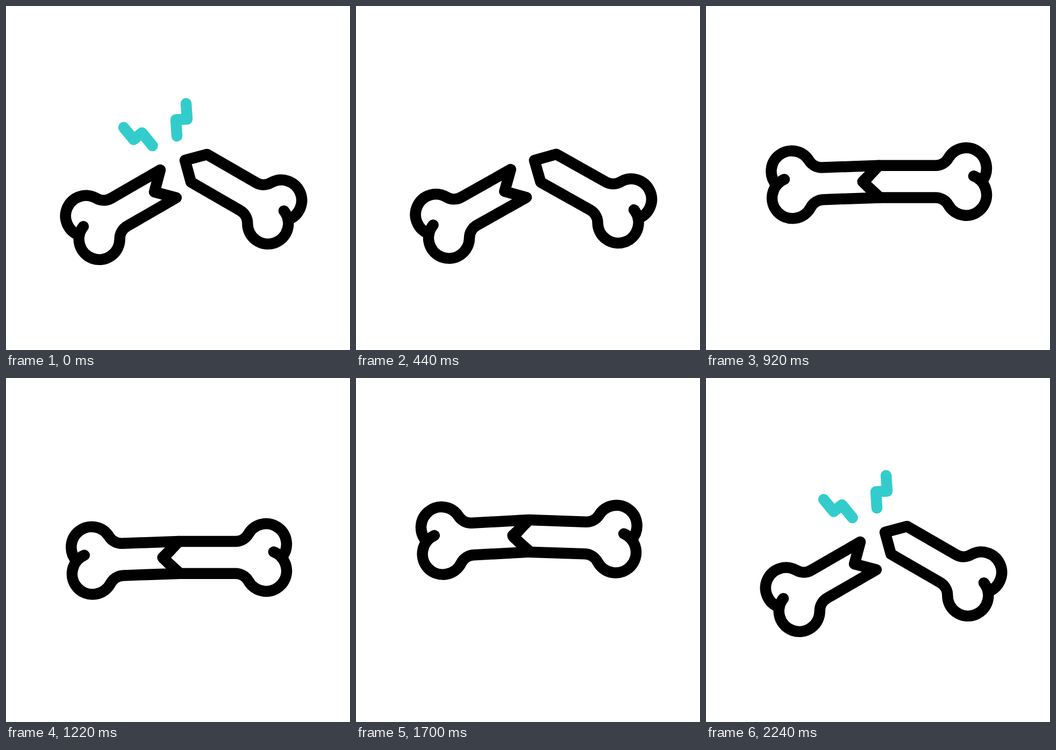
Write an HTML page that moves like this. It is 640 px wide and 640 px high and loops after 2.42 s.

```html
<!DOCTYPE html>
<html lang="en">
<head>
<meta charset="utf-8">
<title>Broken bone</title>
<style>
  html, body { margin: 0; width: 100%; height: 100%; overflow: hidden; background: #fff; }
  svg { display: block; width: 100vw; height: 100vh; }
  path { fill: none; stroke-width: 20.5; stroke-linecap: round; stroke-linejoin: round; }
  .bone path { stroke: #000; }
  .bolt { stroke: #33cccc; }
</style>
</head>
<body>
<svg viewBox="0 0 640 640">
  <g class="bone" id="bone">
    <path id="left"/>
    <path id="right"/>
  </g>
  <path class="bolt" d="M272.5 260 L253 236 L237.5 248.5 L219 226"/>
  <path class="bolt" d="M318 242 L316 211.5 L337 210.5 L335 181.5"/>
</svg>
<script>
const LOOP = 2420;
const $ = id => document.getElementById(id);
const mix = (a, b, p) => a + (b - a) * p;
const span = (t, a, b) => Math.min(1, Math.max(0, (t - a) / (b - a)));
const ease = (t, a, b) => { const p = span(t, a, b); return p * p * (3 - 2 * p); };
const bump = (t, a, b) => Math.sin(Math.PI * span(t, a, b)) ** 2;

// Half a bone pointing right; its origin is the upper corner of the fracture.
const half = notch =>
  'M0 0 H105.5 A27.7 27.7 0 0 0 129.5 -13.9 A38 38 0 1 1 191.1 30 ' +
  'M176.5 19.5 A38 38 0 1 1 129.5 73.6 A27.7 27.7 0 0 0 105.5 59.7 ' +
  `H0 L${notch} 30 L0 0 H20`;

const halves = [
  { el: $('left'), flip: -1, whole: [321.5, 264, -2], broken: [287, 305, -30], flex: [3.3, -1.1] },
  { el: $('right'), flip: 1, whole: [321.5, 264, 0], broken: [374, 276, 30], flex: [-6, 2] }
];
halves.forEach(h => h.el.setAttribute('d', half(-30 * h.flip)));

const bolts = [...document.querySelectorAll('.bolt')].map(el => ({ el, len: el.getTotalLength() }));

function drawBolt({ el, len }, from, to) {
  const shown = to - from;
  el.style.visibility = shown > 0.001 ? 'visible' : 'hidden';
  el.setAttribute('stroke-dasharray', `${shown * len} ${len * 2}`);
  el.setAttribute('stroke-dashoffset', -from * len);
}

function draw(t) {
  const apart = 1 - ease(t, 410, 750) + ease(t, 1935, 2160);
  const open = bump(t, 0, 415), bent = bump(t, 1460, 1940);
  const drop = 51 * (ease(t, 745, 1040) - ease(t, 1040, 1645));
  $('bone').setAttribute('transform', `translate(0 ${drop})`);

  for (const { el, flip, whole, broken, flex } of halves) {
    const [x, y, turn] = whole.map((v, i) => mix(v, broken[i], apart));
    const swing = open * flex[0] + bent * flex[1];
    el.setAttribute('transform',
      `translate(${x} ${y}) rotate(${turn}) rotate(${swing} 0 30) scale(${flip} 1)`);
  }

  const early = t < 1000;
  const from = early ? ease(t, 0, 300) : 0;
  const to = early ? 1 : ease(t, 2005, 2240);
  bolts.forEach(b => drawBolt(b, from, to));
}

const start = performance.now();
function tick() {
  draw((performance.now() - start) % LOOP);
  requestAnimationFrame(tick);
}
draw(0);
requestAnimationFrame(tick);
</script>
</body>
</html>
```
